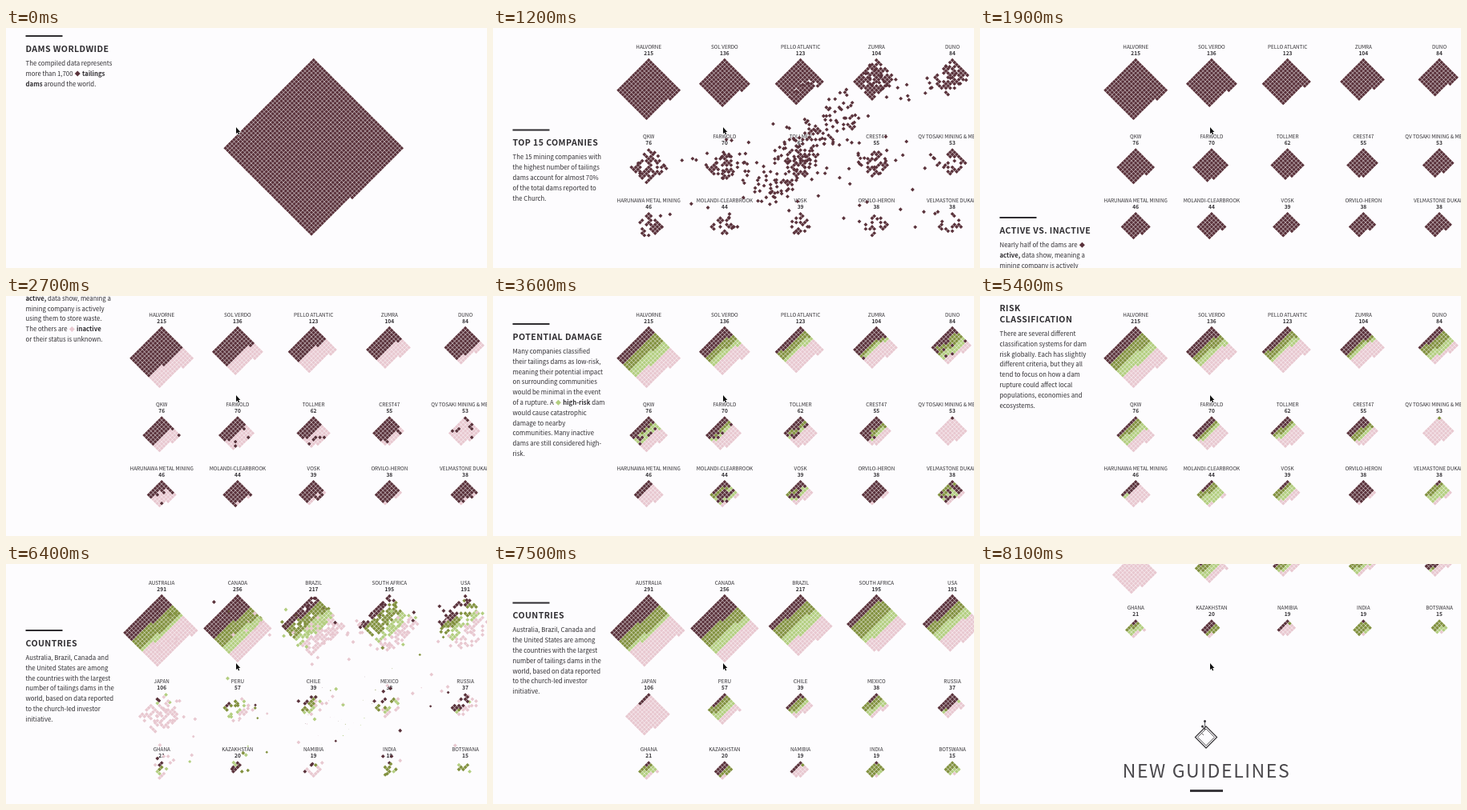
Animation, 600 px wide and 300 px high, one loop 8.2 s. Source, as an HTML page with a canvas:

```html
<!DOCTYPE html>
<html lang="en">
<head>
<meta charset="utf-8">
<title>Dams worldwide</title>
<style>
  html, body { margin: 0; width: 100%; height: 100%; overflow: hidden; background: #fdfcfe; }
  canvas { display: block; }
</style>
</head>
<body>
<canvas id="stage" width="600" height="300"></canvas>
<script>
const ctx = document.getElementById('stage').getContext('2d');
const FONT = '"Noto Sans CJK SC", "Noto Sans CJK JP", "Noto Sans CJK", "Open Sans", sans-serif';
const INK = '#2f2d31';
const COLORS = ['#5a323b', '#82913f', '#b3ce80', '#e8c8d0'];
const LOOP = 8200, STEP = 100;
const PITCH = 2.68, HALF = 2.43, TOTAL = 1746;
const FLIGHT = 250;

// name, number of dams, shares of the first three colours
const companies = [
  ['HALVORNE', 215, .21, .23, .23], ['SOL VERDO', 136, .28, .2, .15],
  ['PELLO ATLANTIC', 123, .18, .22, .12], ['ZUMRA', 104, .35, .1, .1],
  ['DUNO', 84, .2, .35, .25], ['QKW', 76, .12, .2, .28],
  ['FARWOLD', 70, .25, .12, .13], ['TOLLMER', 62, .2, .15, .15],
  ['CREST47', 55, .35, .25, .1], ['QV TOSAKI MINING & METALS', 53, 0, .02, 0],
  ['HARUNAWA METAL MINING', 46, .25, 0, .05], ['MOLANDI-CLEARBROOK', 44, .12, .3, .5],
  ['VOSK', 39, .1, .25, .35], ['ORVILO-HERON', 38, .9, 0, 0],
  ['VELMASTONE DUKARI', 38, .05, .3, .5],
];
const countries = [
  ['AUSTRALIA', 291, .28, .25, .07], ['CANADA', 256, .34, .24, .17],
  ['BRAZIL', 217, .18, .25, .24], ['SOUTH AFRICA', 195, .15, .35, .2],
  ['USA', 191, .2, .2, .2], ['JAPAN', 106, .05, 0, 0],
  ['PERU', 57, .1, .3, .3], ['CHILE', 39, .2, .3, .2],
  ['MEXICO', 38, .1, .4, .3], ['RUSSIA', 37, .5, .05, .05],
  ['GHANA', 21, .1, .3, .4], ['KAZAKHSTAN', 20, .5, .4, 0],
  ['NAMIBIA', 19, .25, .05, 0], ['INDIA', 19, .05, .8, .1],
  ['BOTSWANA', 15, 0, .6, .35],
];
const companyRows = [37.6, 150, 229.7], countryRows = [37.6, 161, 246];

// * toggles bold, a digit before the diamond picks its colour
const blocks = [
  [10, ['DAMS WORLDWIDE'], ['The compiled data represents', 'more than 1,700 0◆ *tailings',
    '*dams* around the world.']],
  [325, ['TOP 15 COMPANIES'], ['The 15 mining companies with', 'the highest number of tailings',
    'dams account for almost 70%', 'of the total dams reported to', 'the Church.']],
  [670, ['ACTIVE VS. INACTIVE'], ['Nearly half of the dams are 0◆', '*active,* data show, meaning a',
    'mining company is actively', 'using them to store waste.', 'The others are 3◆ *inactive*',
    'or their status is unknown.']],
  [1065, ['POTENTIAL DAMAGE'], ['Many companies classified', 'their tailings dams as low-risk,',
    'meaning their potential impact', 'on surrounding communities', 'would be minimal in the event',
    'of a rupture. A 2◆ *high-risk* dam', 'would cause catastrophic', 'damage to nearby',
    'communities. Many inactive', 'dams are still considered high-', 'risk.']],
  [1485, ['RISK', 'CLASSIFICATION'], ['There are several different', 'classification systems for dam',
    'risk globally. Each has slightly', 'different criteria, but they all', 'tend to focus on how a dam',
    'rupture could affect local', 'populations, economies and', 'ecosystems.']],
  [1875, ['COUNTRIES'], ['Australia, Brazil, Canada and', 'the United States are among',
    'the countries with the largest', 'number of tailings dams in the', 'world, based on data reported',
    'to the church-led investor', 'initiative.']],
];

// time, scroll offset
const scrollKeys = [[0, 0], [200, 7], [500, 7], [1200, 197.5], [1900, 433], [3600, 1030],
  [5000, 1468], [5400, 1486], [5500, 1486], [6400, 1792], [7400, 1792], [8100, 2033]];
const RELEASE = 1856; // the chart stays pinned up to this offset

// start and spread of each rearrangement
const moves = [[600, 920], [2100, 900], [3200, 900], [5600, 1350]];

let seed = 7;
const random = () => (seed = seed * 16807 % 2147483647) / 2147483647;
const clamp = v => Math.max(0, Math.min(1, v));
const lerp = (a, b, u) => a + (b - a) * u;
const ease = u => u < .5 ? 4 * u ** 3 : 1 - (2 - 2 * u) ** 3 / 2;
const ramp = (t, from, to) => clamp((t - from) / (to - from));
const columnX = k => 194.2 + k % 5 * 94.7;
const rank = (i, count) => (i / count) ** .8;
const countAll = groups => groups.reduce((sum, group) => sum + group[1], 0);

function shuffle(list) {
  for (let i = list.length - 1; i > 0; i--) {
    const j = Math.floor(random() * (i + 1));
    [list[i], list[j]] = [list[j], list[i]];
  }
  return list;
}

// slot i of a diamond of `count` cells, filled in rows along the upper left edge
function slot(count, i, cx, top) {
  const cols = Math.ceil(Math.sqrt(count)), row = Math.floor(i / cols), col = i % cols;
  return { x: cx + (row - col) * PITCH, y: top + (row + col + 1) * PITCH };
}

// calls visit(place, colour) for every cell of every group
function eachCell(groups, rows, visit) {
  groups.forEach(([, count, a, b, c], k) => {
    const ends = [a, a + b, a + b + c].map(share => Math.round(share * count));
    for (let i = 0; i < count; i++) {
      visit(slot(count, i, columnX(k), rows[Math.floor(k / 5)]), ends.filter(end => i >= end).length);
    }
  });
}

function buildDots() {
  const dots = [], pools = [[], [], [], []], spare = [];
  const shown = countAll(companies), listed = countAll(countries);
  const addDot = (order, rest) => {
    const start = { ...slot(TOTAL, dots.length, 383.7, 37.6), size: 1, color: 0 };
    const dot = { poses: [start, ...rest(start)], orders: [order, order, order, .3],
      luck: moves.map(random) };
    dots.push(dot);
    return dot;
  };

  eachCell(companies, companyRows, (place, kind) => {
    const shades = [0, kind === 3 ? 3 : 0, kind];
    pools[kind].push(addDot(rank(dots.length, shown),
      () => shades.map(color => ({ ...place, size: 1, color }))));
  });
  while (dots.length < TOTAL) {
    spare.push(addDot(.3, start => Array(3).fill({ ...start, size: 0 })));
  }

  // dots keep their colour on the way to a country, spare ones fill the rest
  [...pools, spare].forEach(shuffle);
  let n = 0;
  eachCell(countries, countryRows, (place, color) => {
    const dot = pools[color].pop() || spare.pop();
    dot.poses.push({ ...place, size: 1, color });
    dot.orders[3] = rank(n++, listed);
  });
  [...pools.flat(), ...spare].forEach(({ poses }) => poses.push({ ...poses[3], size: 0 }));
  return dots;
}
const dots = buildDots();

function scrollAt(t) {
  const i = Math.max(1, scrollKeys.findIndex(key => key[0] >= t));
  const [t0, s0] = scrollKeys[i - 1], [t1, s1] = scrollKeys[i];
  return lerp(s0, s1, ramp(t, t0, t1));
}

function diamond(x, y, half) {
  ctx.beginPath();
  ctx.moveTo(x, y - half);
  ctx.lineTo(x + half, y);
  ctx.lineTo(x, y + half);
  ctx.lineTo(x - half, y);
  ctx.closePath();
}

function write(text, x, y, size, weight = 400, align = 'left', spacing = 0) {
  ctx.font = `${weight} ${size}px ${FONT}`;
  ctx.letterSpacing = spacing + 'px';
  ctx.textAlign = align;
  ctx.fillText(text, x, y);
  return ctx.measureText(text).width;
}

function writeRich(line, x, y) {
  let weight = 400;
  for (const part of line.split(/(\*|[0-3]◆)/)) {
    if (part === '*') weight = 1100 - weight;
    else if (part.endsWith('◆')) {
      ctx.fillStyle = COLORS[part[0]];
      diamond(x + 4, y - 2.7, 3.5);
      ctx.fill();
      ctx.fillStyle = INK;
      x += 8;
    } else x += write(part, x, y, 7.8, weight);
  }
}

function drawBlock([top, titles, lines], scroll) {
  let y = top - scroll;
  if (y < -200 || y > 310) return;
  ctx.fillStyle = INK;
  ctx.fillRect(24.5, y - 1, 46, 2);
  y += 2;
  for (const title of titles) write(title, 24.5, (y += 14) + 3.9, 10.6, 700, 'left', .4);
  y += 5.2;
  for (const line of lines) writeRich(line, 24.5, (y += 12.8) + 2.9);
}

function drawLabels(groups, rows, alpha) {
  if (!alpha) return;
  ctx.globalAlpha = alpha;
  ctx.fillStyle = INK;
  groups.forEach(([name, count], k) => {
    const top = rows[Math.floor(k / 5)];
    write(name, columnX(k), top - 11.8, 6.3, 400, 'center');
    write(count, columnX(k), top - 4.1, 6.6, 700, 'center');
  });
  ctx.globalAlpha = 1;
}

function drawDot({ poses, orders, luck }, t) {
  let { x, y, size, color } = poses[0];
  moves.forEach(([start, spread], k) => {
    const u = ease(clamp((t - start - spread * orders[k] * luck[k]) / FLIGHT));
    if (!u) return;
    const to = poses[k + 1];
    x = lerp(x, to.x, u);
    y = lerp(y, to.y, u);
    size = lerp(size, to.size, u);
    color = to.color;
  });
  if (size < .02) return;
  ctx.fillStyle = COLORS[color];
  diamond(x, y, HALF * size);
  ctx.fill();
}

function drawHeading() {
  ctx.strokeStyle = ctx.fillStyle = '#3a383c';
  ctx.lineWidth = 1.3;
  diamond(282, 393.5, 13.5);
  ctx.stroke();
  ctx.lineWidth = .8;
  diamond(282, 393.5, 10.5);
  ctx.stroke();
  ctx.beginPath();
  ctx.moveTo(280.5, 373);
  ctx.lineTo(280.5, 385);
  ctx.moveTo(277, 380);
  ctx.lineTo(280.5, 384);
  ctx.moveTo(276, 388);
  ctx.lineTo(279, 391);
  ctx.stroke();
  for (const [x, y] of [[280.5, 373.5], [277.5, 380]]) {
    ctx.beginPath();
    ctx.arc(x, y, 1.5, 0, 7);
    ctx.fill();
  }
  ctx.fillRect(262, 459, 41, 3);
  ctx.fillStyle = '#49474b';
  write('NEW GUIDELINES', 282.5, 443.7, 23, 300, 'center', 1.6);
}

function drawCursor() {
  ctx.beginPath();
  [[287, 124], [287, 132.2], [288.8, 130.6], [290, 133.4], [291.3, 132.8], [290.1, 130.1],
    [292.4, 129.9]].forEach(p => ctx.lineTo(...p));
  ctx.closePath();
  ctx.strokeStyle = '#fff';
  ctx.lineWidth = 1.2;
  ctx.stroke();
  ctx.fillStyle = '#111';
  ctx.fill();
}

function draw(t) {
  const scroll = scrollAt(t);
  ctx.clearRect(0, 0, 600, 300);
  blocks.forEach(block => drawBlock(block, scroll));
  ctx.save();
  ctx.translate(0, -Math.max(0, scroll - RELEASE));
  drawLabels(companies, companyRows, ramp(t, 600, 900) * (1 - ramp(t, 5700, 5900)));
  drawLabels(countries, countryRows, ramp(t, 5800, 6000));
  dots.forEach(dot => drawDot(dot, t));
  drawHeading();
  ctx.restore();
  drawCursor();
}

// the picture advances ten times a second
const begin = performance.now();
function tick() {
  const t = (performance.now() - begin) % LOOP;
  draw(Math.floor(t / STEP) * STEP);
  requestAnimationFrame(tick);
}
tick();
</script>
</body>
</html>
```
